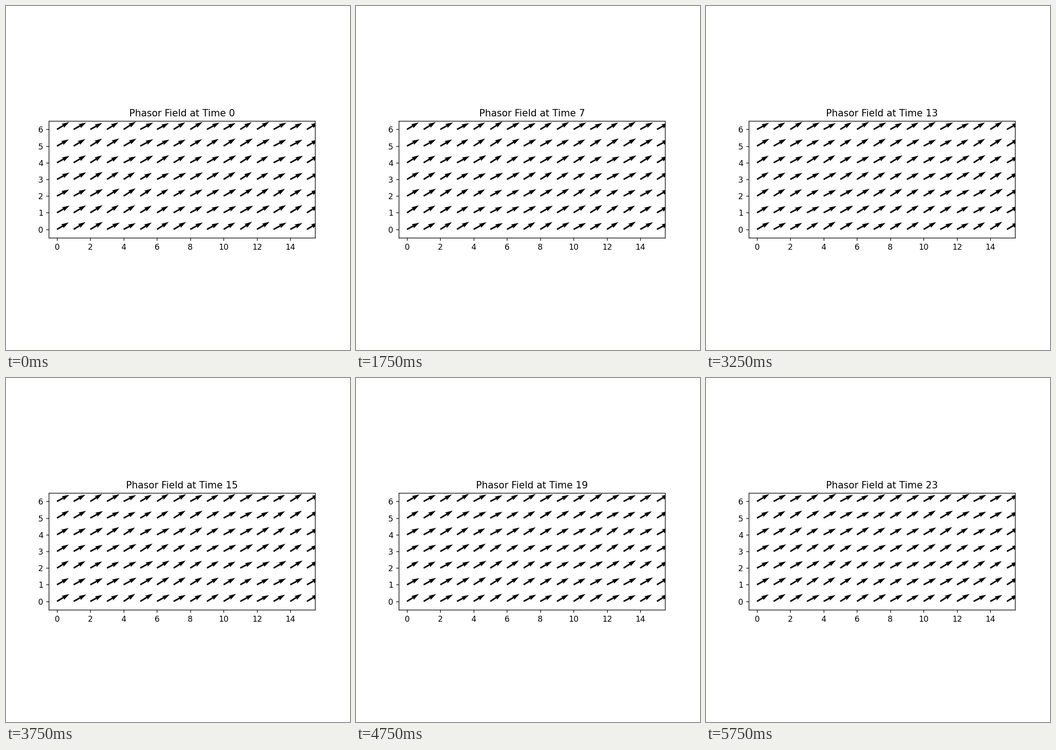
A matplotlib script for the animation above (6000 ms loop, 748x748 px).

```python
import numpy as np
import matplotlib.pyplot as plt
from matplotlib.animation import FuncAnimation

SIZE = 748
COLS, ROWS, STEPS = 16, 7, 24
UNIT = 30.4  # length of the steady phasor in pixels
NUDGE = 0.001  # axes shift up and left, as a share of the figure

# One travelling wave per row, bottom row first, in 1/24 turns
offset = np.array([13, 1, -6, -2, -1, 15, 5])
slope = np.array([-4.8, 2.1, 3.1, 3.3, 5.2, -3.2, -6])

x, y = np.meshgrid(np.arange(COLS), np.arange(ROWS))
phase = offset[:, None] + slope[:, None] * x
swing = 1.3 - 0.4 * np.cos(2 * np.pi * (x - 0.5) / 7.7)


def field(t):
    """Steady phasor at 30 degrees plus a small one that turns once a loop."""
    turn = 2j * np.pi * (t + phase) / STEPS
    return np.exp(1j * np.pi / 6) + swing / UNIT * np.exp(turn)


fig, ax = plt.subplots(figsize=(6, 6), dpi=SIZE / 6)
fig.subplots_adjust(left=0.125 - NUDGE, right=0.9 - NUDGE,
                    bottom=0.11 + NUDGE, top=0.88 + NUDGE)
ax.set_aspect("equal")
ax.set_xlim(-0.5, COLS - 0.5)
ax.set_ylim(-0.5, ROWS - 0.5)
ax.set_xticks(range(0, COLS, 2))
ax.set_yticks(range(ROWS))
title = ax.set_title("Phasor Field at Time 0")

start = field(0)
arrows = ax.quiver(x, y, start.real, start.imag,
                   scale=1.8 * np.sqrt(COLS * ROWS), scale_units="width")


def update(t):
    z = field(t)
    arrows.set_UVC(z.real, z.imag)
    title.set_text(f"Phasor Field at Time {t}")
    return arrows, title


anim = FuncAnimation(fig, update, frames=STEPS, interval=250, repeat=True)
plt.show()
```
